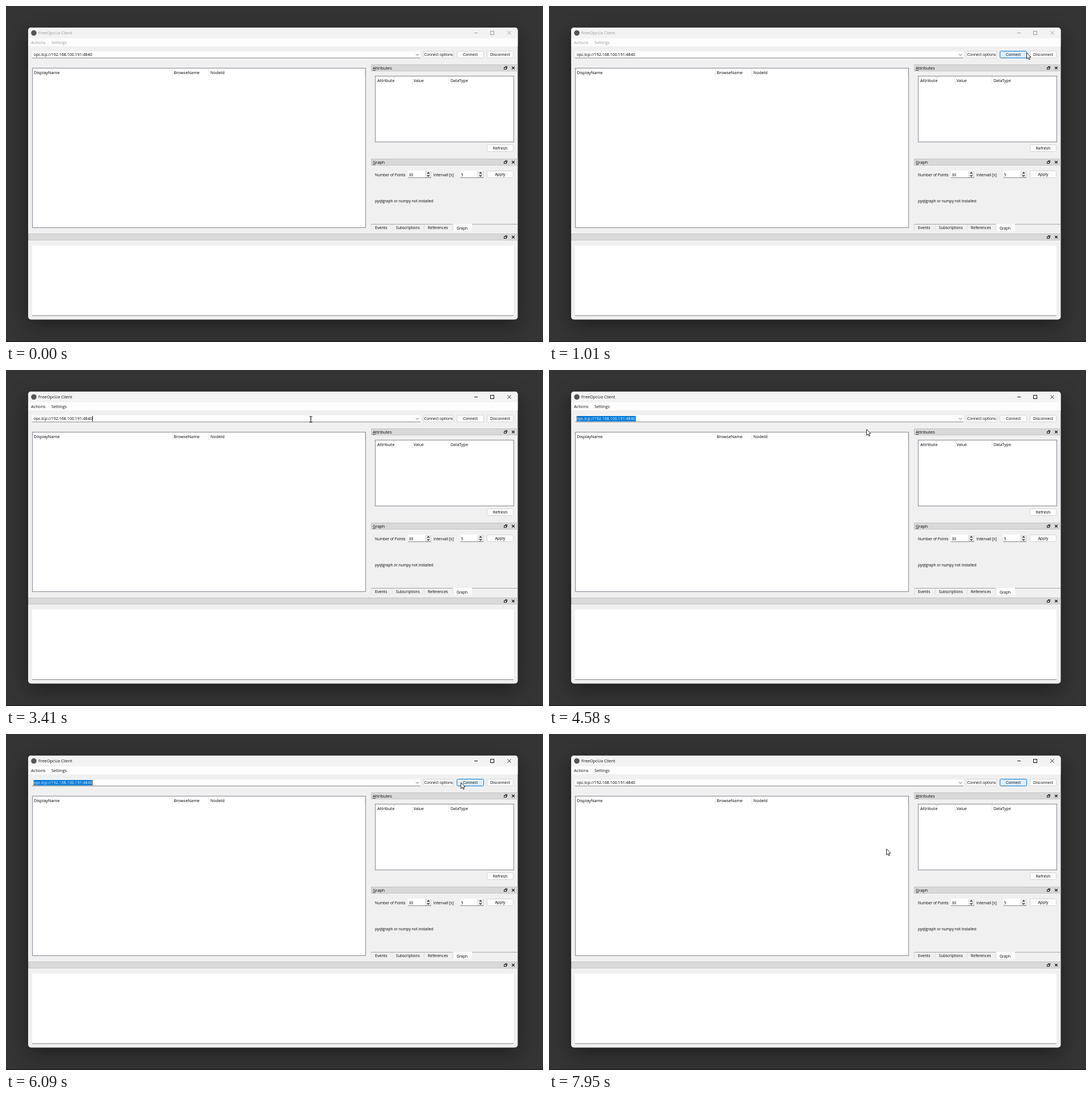
These frames come from a looping animation (946 px wide and 592 px high, 7990 ms). An HTML page with a canvas:

```html
<!DOCTYPE html>
<html lang="en">
<head>
<meta charset="utf-8">
<title>FreeOpcUa Client</title>
<style>
html, body { margin: 0; width: 100%; height: 100%; overflow: hidden; background: #343434; }
canvas { display: block; }
</style>
</head>
<body>
<canvas width="946" height="592"></canvas>
<script>
const ctx = document.querySelector('canvas').getContext('2d');
const LOOP = 7990;

// Pointer moves: start, end, steps, target x, target y
const MOVES = [
  [340, 540, 7, 874, 271],
  [810, 910, 4, 780, 108],
  [940, 1010, 3, 841, 82],
  [1240, 1400, 6, 770, 60],
  [2270, 2430, 6, 529, 82],
  [3000, 3210, 7, 537, 87],
  [4410, 4580, 5, 559, 104],
  [5480, 5680, 7, 689, 110],
  [5880, 6090, 7, 801, 85],
  [6120, 6210, 4, 806, 82],
  [7270, 7520, 9, 609, 202],
  [7950, 7950, 1, 594, 202],
];

// Buttons: label, x, y, width, font size
const BUTTONS = [
  ['Connect options', 735, 79, 54, 6.6],
  ['Connect', 794, 79, 48, 6.8],
  ['Disconnect', 847, 79, 47, 6.8],
  ['Refresh', 847, 244, 47, 7.2],
  ['Apply', 847, 290, 47, 6.9],
];

const between = (t, a, b) => t >= a && t < b;

function rect(x, y, w, h, color) {
  ctx.fillStyle = color;
  ctx.fillRect(x, y, w, h);
}

function frame(x, y, w, h, fill, border) {
  rect(x, y, w, h, border);
  rect(x + 1, y + 1, w - 2, h - 2, fill);
}

function text(str, x, y, size = 7, color = '#000', align = 'left') {
  ctx.font = `${size}px "Open Sans", "Noto Sans", sans-serif`;
  ctx.textAlign = align;
  ctx.fillStyle = color;
  ctx.fillText(str, x, y);
}

function line(points, color = '#222', width = 1) {
  ctx.beginPath();
  points.forEach(([x, y]) => ctx.lineTo(x, y));
  ctx.strokeStyle = color;
  ctx.lineWidth = width;
  ctx.stroke();
}

function cross(x, y, r, color, width) {
  line([[x - r, y - r], [x + r, y + r]], color, width);
  line([[x - r, y + r], [x + r, y - r]], color, width);
}

function roundBox(x, y, w, h, r, fill, border) {
  ctx.beginPath();
  ctx.roundRect(x, y, w, h, r);
  ctx.fillStyle = fill;
  ctx.fill();
  if (border) {
    ctx.strokeStyle = border;
    ctx.lineWidth = 1;
    ctx.stroke();
  }
}

function pointerAt(t) {
  let x = 940, y = 660;
  for (const [start, end, steps, tx, ty] of MOVES) {
    if (t < start) break;
    const step = steps > 1 ? Math.floor((t - start) / (end - start) * (steps - 1) + 1e-6) : 0;
    const u = 1 - (1 - Math.min(1, (step + 1) / steps)) ** 1.85;
    x += (tx - x) * u;
    y += (ty - y) * u;
  }
  return [x, y];
}

function drawWindow(active) {
  const ink = active ? '#111' : '#999';
  rect(0, 0, 946, 592, '#343434');
  rect(0, 590, 946, 2, '#292526');
  ctx.save();
  ctx.shadowColor = 'rgba(0,0,0,.4)';
  ctx.shadowBlur = 34;
  ctx.shadowOffsetY = 10;
  roundBox(39, 38, 862.5, 514.5, 5, '#f0f0f0');
  ctx.restore();
  roundBox(39, 38, 862.5, 19, [5, 5, 0, 0], '#f3f3f3');
  rect(39, 57, 862.5, 14, '#fdfdfd');

  ctx.beginPath();
  ctx.arc(49, 47.5, 4.8, 0, 7);
  ctx.fillStyle = '#555';
  ctx.fill();
  text('FreeOpcUa Client', 57, 50, 7.35, ink);
  line([[825, 47.5], [831, 47.5]], ink);
  ctx.strokeRect(853.5, 44.5, 6, 6);
  cross(886.5, 47.5, 3, ink, 1);
  text('Actions', 44, 67, 7.5, ink);
  text('Settings', 80, 67, 7.3, ink);
}

function dockHeader(title, x, y) {
  frame(x, y, 901.5 - x, 12, '#d9d9d9', '#c3c3c3');
  text(title, 646, y + 9, 7.3);
  if (title) rect(646, y + 10, 5, .8, '#333');
  ctx.strokeStyle = '#222';
  ctx.lineWidth = 1;
  ctx.strokeRect(879.5, y + 3.5, 3, 3);
  frame(877, y + 5, 5, 4, '#d9d9d9', '#222');
  cross(893.5, y + 6.2, 2.2, '#111', 1.2);
}

function table(x, y, w, h, columns) {
  frame(x, y, w, h, '#fff', '#828790');
  columns.forEach(([label, cx, size], i) => {
    text(label, cx, y + 11, size);
    if (i) rect(cx - 3, y + 1, 1, 14, '#e3e3e3');
  });
}

function spinBox(x, value) {
  rect(x, 290, 41, 13, '#fff');
  rect(x, 302, 41, 1, '#888');
  text(value, x + 1.5, 299.5, 6.9);
  frame(x + 31, 291, 10, 11, '#f0f0f0', '#cfcfcf');
  line([[x + 34, 295.3], [x + 36, 293.3], [x + 38, 295.3]], '#222', 1.2);
  line([[x + 34, 298], [x + 36, 300], [x + 38, 298]], '#222', 1.2);
}

function drawPanels() {
  table(46, 109, 588, 282, [['DisplayName', 49, 7.4], ['BrowseName', 295.5, 7.3], ['NodeId', 360, 7.3]]);
  rect(632, 110, 1, 14, '#e3e3e3');

  dockHeader('Attributes', 643, 103);
  table(650, 123, 245, 117, [['Attribute', 654, 7.4], ['Value', 718, 7], ['DataType', 783, 7]]);
  line([[681.5, 124.8], [683.8, 126.8], [686, 124.8]], '#999', .7);

  dockHeader('Graph', 643, 269);
  text('Number of Points', 650, 299.5, 6.5);
  spinBox(708, '30');
  text('Intervall [s]', 753, 299.5, 6.9);
  spinBox(800, '5');
  text('pyqtgraph or numpy not installed', 650, 345.5, 6.6);

  rect(643, 384, 258, 1, '#a5a5a5');
  rect(787, 384, 34, 13, '#fcfcfc');
  for (const x of [643, 680, 736, 787]) rect(x, 385, 1, 11, '#dedede');
  text('Events', 650, 393, 7.1);
  text('Subscriptions', 687, 393, 6.65);
  text('References', 743, 393, 6.9);
  text('Graph', 794, 394, 6.6);

  dockHeader('', 39, 401);
  rect(46, 422, 848, 123, '#fff');
  rect(46, 545, 848, 1, '#868686');
}

function drawAddress(t) {
  const selected = between(t, 3670, 3910) || between(t, 3980, 6840);
  const caret = between(t, 3370, 3910) || between(t, 3980, 4440) ||
    between(t, 4940, 5480) || between(t, 6000, 6500);
  rect(46, 80, 684, 12, '#fff');
  rect(46, 91, 684, 1, '#888');
  line([[722, 84.7], [724.7, 87.2], [727.4, 84.7]], '#555', .9);
  if (selected) rect(48.5, 81, 104.5, 9.5, '#0078d7');
  text('opc.tcp://192.168.100.191:4840', 48.7, 88.3, 7.05, selected ? '#fff' : '#000');
  if (caret) rect(152, 81, 1, 9.5, selected ? '#ff8728' : '#000');
}

function drawButtons(t, px, py) {
  for (const [label, x, y, w, size] of BUTTONS) {
    const hover = px >= x && px < x + w && py >= y && py < y + 13;
    const isConnect = label === 'Connect';
    const lit = hover || (isConnect && t >= 6840);
    const pressed = isConnect && between(t, 6840, 6940);
    const fill = pressed ? '#cce4f7' : lit ? '#e0eef9' : '#fdfdfd';
    roundBox(x + .5, y + .5, w - 1, 12, 2, fill, lit ? '#0078d4' : '#d4d4d4');
    text(label, x + w / 2, y + 9.3, size, '#000', 'center');
  }
}

function drawPointer(x, y) {
  const overAddress = x > 46 && x < 715 && y > 79 && y < 92;
  if (overAddress) {
    line([[x, y - 5], [x, y + 5]], '#000', 1.1);
    for (const end of [-5, 5]) line([[x - 2.5, y + end], [x + 2.5, y + end]], '#000', .9);
    return;
  }
  ctx.save();
  ctx.translate(x + .5, y + .5);
  ctx.beginPath();
  [[0, 0], [0, 10.6], [2.5, 8.4], [4.1, 12], [5.8, 11.3], [4.2, 7.8], [7.4, 7.5]]
    .forEach(p => ctx.lineTo(...p));
  ctx.closePath();
  ctx.fillStyle = '#fff';
  ctx.fill();
  ctx.strokeStyle = '#111';
  ctx.lineWidth = .9;
  ctx.stroke();
  ctx.restore();
}

function draw(now) {
  const t = now % LOOP;
  const [x, y] = pointerAt(t);
  drawWindow(t >= 1600);
  drawPanels();
  drawAddress(t);
  drawButtons(t, x, y);
  drawPointer(x, y);
  requestAnimationFrame(draw);
}
requestAnimationFrame(draw);
</script>
</body>
</html>
```
